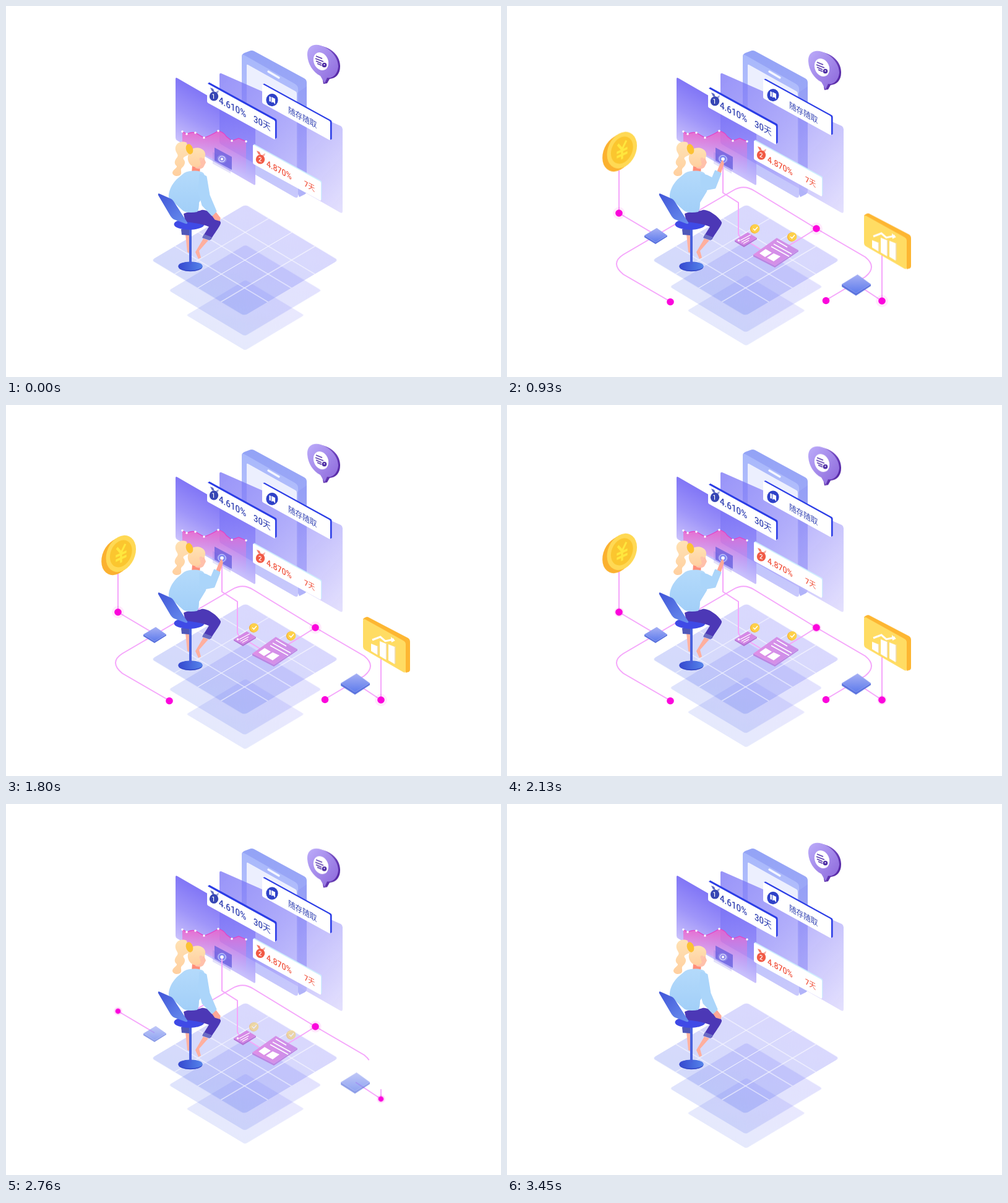
Recreate the animation shown at these times as an HTML page. Size 800 px wide and 600 px high, loop 3480 ms.

```html
<!DOCTYPE html>
<html lang="zh">
<head>
<meta charset="utf-8">
<title>Isometric savings</title>
<style>
html, body { margin: 0; width: 100%; height: 100%; overflow: hidden; background: #fff; }
svg { display: block; width: 800px; height: 600px; }
text { font-family: Roboto, "Noto Sans CJK SC", "Noto Sans CJK", sans-serif; font-weight: 500; }

/* floating parts: two bobs per loop */
.bob { animation: bob 1740ms cubic-bezier(.37, 0, .63, 1) infinite; }
@keyframes bob { 50% { transform: translateY(var(--dy)); } }

.main, .net, .stem, .card, .doc, .tick, .cube, .pop, .hub, .joint, .lit, .arm, .hand {
  animation: 3480ms linear infinite;
}
.wire { fill: none; stroke: #f5a6fb; stroke-width: 2; stroke-dasharray: 1 2; }
.main { animation-name: main; }
.net { animation-name: net; }
.stem { animation-name: stem; }
@keyframes main { 0%, 5.17% { stroke-dashoffset: 1; } 12.64%, 80.5% { stroke-dashoffset: 0; } 89%, 100% { stroke-dashoffset: 1; } }
@keyframes net { 0%, 12.9% { stroke-dashoffset: 1; } 22.5%, 75.9% { stroke-dashoffset: 0; } 82.8%, 100% { stroke-dashoffset: 1; } }
@keyframes stem { 0%, 18.4% { stroke-dashoffset: 1; } 23.6%, 77% { stroke-dashoffset: 0; } 81.9%, 100% { stroke-dashoffset: 1; } }

.card { animation-name: card; }
.doc { animation-name: doc; }
.tick { animation-name: tick; }
.cube { animation-name: cube; }
.lit { animation-name: lit; }
@keyframes card { 0%, 7.7% { opacity: 0; } 11.2%, 87.4% { opacity: 1; } 92%, 100% { opacity: 0; } }
@keyframes doc { 0%, 11.4% { opacity: 0; } 15.5%, 81% { opacity: 1; } 88%, 100% { opacity: 0; } }
@keyframes tick { 0%, 15.5% { opacity: 0; } 20.1%, 77.6% { opacity: 1; } 81%, 100% { opacity: 0; } }
@keyframes cube { 0%, 17.2% { opacity: 0; } 20.1%, 78.2% { opacity: 1; } 81.9%, 100% { opacity: 0; } }
@keyframes lit { 0%, 4.3% { opacity: 0; } 6.5%, 79.3% { opacity: 1; } 94%, 100% { opacity: 0; } }

.pop { animation-name: pop; }
.pop.fade { animation-name: pop, fade; }
.hub { animation-name: hub; }
.joint { animation-name: joint; }
.mid { transform-box: fill-box; transform-origin: center; }
@keyframes pop { 0%, 20.1% { transform: scale(0); } 25.9%, 69% { transform: none; } 76.4%, 100% { transform: scale(0); } }
@keyframes fade { 0%, 20.1% { opacity: 0; } 25.9%, 69% { opacity: 1; } 76.4%, 100% { opacity: 0; } }
@keyframes hub { 0%, 12.4% { transform: scale(0); } 16.1%, 80.5% { transform: none; } 83.3%, 100% { transform: scale(0); } }
@keyframes joint { 0%, 20.7% { transform: scale(0); } 24.1%, 78.4% { transform: none; } 82.2%, 100% { transform: scale(0); } }
.halo { opacity: .08; animation: halo 870ms ease-in-out infinite; transform-box: fill-box; transform-origin: center; }
@keyframes halo { 50% { transform: scale(.75); opacity: .14; } }

.arm { animation-name: arm; }
.hand { animation-name: hand; }
@keyframes arm {
  0%, .9%, 77.6%, 100% { d: path("M314 272L323 276L328 306L339 332L333 338L318 322L312 300Z"); }
  5.75%, 69.8% { d: path("M314 272L324 275L332 279L337 267L345 271L336 294L314 298Z"); }
}
@keyframes hand {
  0%, .9%, 77.6%, 100% { d: path("M333 338L339 334L346 343L345 347L338 345Z"); }
  5.75%, 69.8% { d: path("M340 268L345 270L350 255L348 250L344 258Z"); }
}
</style>
</head>
<body>
<svg viewBox="0 0 800 600">
<defs>
  <linearGradient id="floor"><stop stop-color="#6078f0"/><stop offset="1" stop-color="#7470fa"/></linearGradient>
  <linearGradient id="left" x2="0" y2="1"><stop stop-color="#8176f6"/><stop offset=".5" stop-color="#9f95f9"/><stop offset="1" stop-color="#cac1fc"/></linearGradient>
  <linearGradient id="right" x2="1" y2="1"><stop stop-color="#6c66f5" stop-opacity=".9"/><stop offset=".45" stop-color="#958ef9" stop-opacity=".88"/><stop offset="1" stop-color="#d9d4fd" stop-opacity=".9"/></linearGradient>
  <linearGradient id="phone" x2="0" y2="1"><stop stop-color="#a8b8fb"/><stop offset="1" stop-color="#c9c9fc"/></linearGradient>
  <linearGradient id="edge" x2="0" y2="1"><stop stop-color="#93a3f6"/><stop offset="1" stop-color="#b2b4f9"/></linearGradient>
  <linearGradient id="pink" x2="0" y2="1"><stop stop-color="#f062c8" stop-opacity=".85"/><stop offset="1" stop-color="#e69cf0" stop-opacity="0"/></linearGradient>
  <linearGradient id="bubble" x2="1" y2="1"><stop stop-color="#bcacfa"/><stop offset="1" stop-color="#8b66da"/></linearGradient>
  <linearGradient id="deep" x2="1" y2="1"><stop stop-color="#8a68da"/><stop offset="1" stop-color="#4d1c9c"/></linearGradient>
  <linearGradient id="back" x2="1" y2="1"><stop stop-color="#4055d8"/><stop offset="1" stop-color="#6a90ee"/></linearGradient>
  <linearGradient id="base"><stop stop-color="#3548cf"/><stop offset="1" stop-color="#5584ea"/></linearGradient>
  <linearGradient id="slab" x2="0" y2="1"><stop stop-color="#a6b0f4"/><stop offset="1" stop-color="#5f7cec"/></linearGradient>
  <linearGradient id="knit" x2="0" y2="1"><stop stop-color="#b4dafb"/><stop offset="1" stop-color="#a2cff8"/></linearGradient>
  <linearGradient id="hair" x2="0" y2="1"><stop stop-color="#ffe2b4"/><stop offset="1" stop-color="#ffcf9f"/></linearGradient>
  <linearGradient id="paper" x2="1"><stop stop-color="#e08fe6"/><stop offset="1" stop-color="#c890ea"/></linearGradient>
  <rect id="tile" width="100" height="100" rx="3" fill="url(#floor)"/>
  <rect id="plate" width="127" height="31" rx="2"/>
  <g id="slabs">
    <path d="M-18 0L0 11L19 0V2L0 14L-18 3Z" fill="#5a72de"/>
    <path d="M-18 0L2 -12L19 0L0 11Z" fill="url(#slab)"/>
  </g>
  <g id="ok">
    <circle cx="-.8" cy=".6" r="7.3" fill="#f8b22e"/>
    <circle cx=".4" r="7" fill="#fdd04a"/>
    <path d="M-3 0L-.5 2.6L4 -2.4" fill="none" stroke="#fff" stroke-width="1.5"/>
  </g>
  <g id="medal">
    <path d="M-6 -14L-1 -12L1 -7L-3 -8Z" opacity=".8"/>
    <path d="M3 -7L8 -10L7 -6L4 -4Z" opacity=".5"/>
    <ellipse rx="7.2" ry="7.6"/>
  </g>
</defs>

<!-- floor -->
<g class="bob" style="--dy:-7.5px"><use href="#tile" transform="matrix(.955 -.57 .95 .57 291.5 500)" opacity=".16"/></g>
<g class="bob" style="--dy:-6px"><use href="#tile" transform="matrix(1.24 -.74 1.23 .74 263 460)" opacity=".2"/></g>
<g transform="matrix(1.52 -.9 1.5 .9 235 411)">
  <use href="#tile" opacity=".27"/>
  <path d="M25 0V100M50 0V100M75 0V100M0 25H100M0 50H100M0 75H100" stroke="#fff" stroke-opacity=".85" vector-effect="non-scaling-stroke"/>
</g>

<!-- phone -->
<path d="M381 82Q381 78 385 76L393 73Q397 71 401 73L482 117Q486 119 486 124V299Q486 303 482 305L474 309L470 300V140L384 92Z" fill="url(#edge)"/>
<path d="M381 82Q381 77 386 80L467 126Q472 129 472 134V306Q472 312 466 309L386 263Q381 260 381 255Z" fill="url(#phone)"/>
<path d="M389 96Q389 94 391 95L468 138Q470 139 470 142V284L389 240Z" fill="#eceffe"/>
<path d="M424 106L441 116" stroke="#f4f6ff" stroke-width="3.4" stroke-linecap="round"/>

<!-- screens -->
<g transform="matrix(.866 .5 0 1 274 115)"><rect width="149" height="101" rx="3" fill="url(#left)"/></g>
<path d="M345 111Q345 108 348 109L541 194Q544 196 544 199V332Q544 336 540 334L348 224Q345 222 345 219Z" fill="url(#right)" opacity=".78"/>
<path d="M470 141L486 130V290L470 280Z" fill="#7470f0" opacity=".15"/>
<path d="M285 203L292 207Q300 203 306 205L320 213Q330 210 343 202Q352 204 356 211L365 218L376 214L388 219V275L285 222Z" fill="url(#pink)"/>
<path d="M285 203L292 207Q300 203 306 205L320 213Q330 210 343 202Q352 204 356 211L365 218L376 214L388 219" fill="none" stroke="#e640c6" stroke-width="1.2"/>
<path d="M285 203h0M292 207h0M306 205h0M320 213h0M343 202h0M365 218h0M388 219h0" stroke="#fff" stroke-width="3.6" stroke-linecap="round"/>
<path d="M334 236L363 252V271L334 255Z" fill="#7a70e6" opacity=".2"/>
<path d="M337 229L365 244V265L337 250Z" fill="#5a55dc" opacity=".68"/>
<ellipse cx="349" cy="247.500" rx="8" ry="6.500" fill="#a5a6f2" opacity=".5" transform="rotate(20 349 247.500)"/>
<ellipse cx="349" cy="247.500" rx="5" ry="4.500" fill="none" stroke="#dcdcff" stroke-width="1.2"/>
<circle cx="349" cy="247.500" r="2" fill="#fff"/>
<g class="lit">
  <circle cx="349" cy="247.500" r="6" fill="#8089f2" stroke="#d0d4ff"/>
  <circle cx="349" cy="247.500" r="2.800" fill="#fff"/>
</g>

<!-- rate cards -->
<g class="bob" style="--dy:8px">
  <g transform="matrix(.866 .476 0 1 325 125)" fill="#2b3de6">
    <use href="#plate" x="3" y="-3.500"/><use href="#plate" x="1.500" y="-1.800"/><use href="#plate" fill="#fff"/>
  </g>
  <g fill="#3646b4">
    <use href="#medal" x="336" y="146"/>
    <text transform="matrix(.866 .476 0 1 344 156.500)" font-size="15.5">4.610%</text>
    <text transform="matrix(.866 .476 0 1 400 187)" font-size="15">30天</text>
    <text transform="matrix(.866 .3 0 1 332.500 149)" font-size="11" fill="#fff">1</text>
  </g>
</g>
<g class="bob" style="--dy:-8px">
  <g transform="matrix(.866 .476 0 1 414 126)" fill="#2b3de6">
    <use href="#plate" x="3" y="-2.500"/><use href="#plate" x="1.500" y="-1.300"/><use href="#plate" fill="#fff"/>
  </g>
  <ellipse cx="430" cy="152" rx="9.600" ry="10.200" fill="#2f42c8"/>
  <path d="M425.500 146L428 147V155L425.500 154ZM429 147L435 150V159L432 155.500L429 156Z" fill="#fff"/>
  <text transform="matrix(.866 .476 0 1 456 172.500)" font-size="13.4" fill="#3646b4">随存随取</text>
</g>
<g class="bob" style="--dy:-7px">
  <g transform="matrix(.866 .476 0 1 399 224)" fill="#cdeefd">
    <use href="#plate" x="1.500" y="-2"/><use href="#plate" fill="#fff"/>
  </g>
  <g fill="#f15a45">
    <use href="#medal" x="411" y="248"/>
    <text transform="matrix(.866 .476 0 1 421 259)" font-size="14.3">4.870%</text>
    <text transform="matrix(.866 .476 0 1 482 291)" font-size="12.6">7天</text>
    <text transform="matrix(.866 .3 0 1 408 251)" font-size="11" fill="#fff">2</text>
  </g>
</g>

<!-- speech bubble -->
<g class="bob" style="--dy:10px">
  <path d="M497 66C512 60 541 74 540 98C540 110 533 117 523 118L519 125L513 126L511 115Z" fill="url(#deep)"/>
  <path d="M487 80C486 66 496 60 509 64C524 69 537 83 537 98C536 111 527 118 519 116L515 125L508 113C496 107 488 94 487 80Z" fill="url(#bubble)"/>
  <ellipse cx="509" cy="89.500" rx="11.500" ry="15" fill="#fff" transform="rotate(-24 509 89.500)"/>
  <path d="M501 81L511 85M500 85L513 90M501 89L510 93M503 93L510 96" stroke="#5a3ab0" stroke-width="1.700"/>
  <circle cx="514.500" cy="95.500" r="3.800" fill="#4d2ca4"/>
  <circle cx="514.500" cy="95" r="1.100" fill="#fff"/>
</g>

<!-- wires -->
<g class="wire">
  <path class="main" pathLength="1" d="M349 250V302L374 318V368Q374 371 378 374L420 400Q426 404 433 401L481 372L500 360"/>
  <path class="net" pathLength="1" d="M500 360L400 299Q383 288 366 298L188 402Q166 416 188 434L264 478"/>
  <path class="net" pathLength="1" d="M500 360L579 406Q599 422 579 438L515 476"/>
  <path class="stem" pathLength="1" d="M240 370L181 335V266"/>
  <path class="stem" pathLength="1" d="M565 450L606 477V402"/>
</g>

<!-- papers on the floor -->
<g class="card">
  <path d="M368 379L383 387L404 375V377L383 390L368 381Z" fill="#b470d4"/>
  <path d="M368 379L389 366L404 375L383 387Z" fill="#d588e6"/>
  <path d="M377 379L394 370M379 382L392 375M382 384L391 379" stroke="#fff" stroke-width="1.300"/>
  <circle cx="374.500" cy="379" r="1.800" fill="#fff"/>
</g>
<g class="doc">
  <path d="M398 402L433 420L471 395V397L433 423L398 405Z" fill="#bb84e2"/>
  <path d="M398 402L436 375L471 395L433 420Z" fill="url(#paper)"/>
  <path d="M408 400L418 393L428 399L417 406ZM420 407L431 400L442 405L431 413Z" fill="#fff"/>
  <path d="M436 380L453 390M431 385L460 401M427 389L456 405" stroke="#fff" stroke-width="1.600"/>
</g>
<g class="tick"><use href="#ok" x="401" y="360"/><use href="#ok" x="461" y="373"/></g>
<g class="cube">
  <use href="#slabs" x="240" y="371"/>
  <use href="#slabs" transform="translate(564 450) scale(1.270 1.320)"/>
</g>

<!-- nodes -->
<g fill="#fb05dc">
  <g class="hub mid"><circle class="halo" cx="500" cy="360" r="10"/><circle cx="500" cy="360" r="5.800"/></g>
  <g class="joint mid"><circle class="halo" cx="181" cy="335" r="10"/><circle cx="181" cy="335" r="5.800"/></g>
  <g class="joint mid"><circle class="halo" cx="606" cy="477" r="10"/><circle cx="606" cy="477" r="5.800"/></g>
  <circle class="pop mid" cx="264" cy="478.500" r="5.800"/>
  <circle class="pop mid" cx="515.500" cy="476.500" r="5.800"/>
</g>

<!-- coin -->
<g class="bob" style="--dy:-7.5px"><g class="pop fade" style="transform-origin:181px 275px">
  <g fill="#fbb130">
    <ellipse rx="22.500" ry="31" transform="translate(178.400 245.500) rotate(25)"/>
    <ellipse rx="22.500" ry="31" transform="translate(182 243) rotate(25)"/>
  </g>
  <g transform="translate(185.800 240.500) rotate(25)">
    <ellipse rx="22.500" ry="31" fill="#ffd954"/>
    <ellipse rx="16.500" ry="23" fill="#fbc62f"/>
  </g>
  <path d="M-8 -13L0 -2L8 -13M0 -2V14M-10 0H10M-10 7H10" transform="matrix(.866 -.4 0 1 186 241)" fill="none" stroke="#ffe73e" stroke-width="4"/>
</g></g>

<!-- bar chart sign -->
<g class="bob" style="--dy:-7.5px"><g class="pop fade" style="transform-origin:606px 411px">
  <path d="M577 347Q577 345 582 343Q584 342 587 344L650 377Q653 379 653 383V428Q653 431 650 432L646 433L640 390Z" fill="#fdb632"/>
  <path d="M577 349Q577 345 581 347L642 381Q646 383 646 387V430Q646 434 642 432L580 396Q577 394 577 391Z" fill="#ffdc63"/>
  <path d="M590 386L600 390V404L590 398ZM604 382L614 386V412L604 406ZM618 387L628 391V419L618 413Z" fill="#fff"/>
  <path d="M600 390L602 389V404L600 404ZM614 386L616 385V411L614 412ZM628 391L630 390V418L628 419Z" fill="#f3dca4"/>
  <path d="M592 380L605 375L613 382L627 379" fill="none" stroke="#fff" stroke-width="3"/>
  <path d="M622 375L629 381L623 384Z" fill="#fff"/>
</g></g>

<!-- seated woman -->
<path d="M290 369H296L297 400L293 398Z" fill="#ffb3a2"/>
<path d="M283 361H297V371L284 370Z" fill="#5058b8"/>
<ellipse cx="298" cy="421.500" rx="19.500" ry="7.800" fill="#3448c8"/>
<ellipse cx="298" cy="420.500" rx="19.500" ry="7" fill="url(#base)"/>
<path d="M298 360V418" stroke="#4961dc" stroke-width="4"/>
<ellipse cx="296" cy="353" rx="24.500" ry="9" fill="#3f4ae6"/>
<path d="M319 376L327 379L312 396L315 407L311 409L306 398Z" fill="#ffaf9e"/>
<path d="M287 336C296 331 310 333 316 330C327 328 345 344 347 350C348 354 335 370 331 378L318 373L328 357C316 352 300 350 290 349Z" fill="#4c38b6"/>
<path d="M320 369L333 374L329 379L317 375Z" fill="#6a6cc4"/>
<path d="M301 258L314 259L313 271L300 271Z" fill="#ff8d79"/>
<path class="hand" d="M333 338L339 334L346 343L345 347L338 345Z" fill="#ffa896" stroke="#ffa896" stroke-width="1.500" stroke-linejoin="round"/>
<path d="M288 270C298 265 314 266 319 270C324 277 325 290 323 300L312 318C312 325 311 331 309 333C300 335 290 334 286 331L263 310C262 300 268 288 276 280Z" fill="url(#knit)"/>
<path class="arm" d="M314 272L323 276L328 306L339 332L333 338L318 322L312 300Z" fill="#abd5fa" stroke="#abd5fa" stroke-width="3" stroke-linejoin="round"/>
<path d="M306 238C316 236 322 243 321 248L323 253L320 259C318 264 312 264 306 262Z" fill="#ffc0aa"/>
<path d="M292 221C281 216 272 224 274 233C275 238 279 240 277 244C272 250 271 255 276 259C277 262 269 265 269 270C270 276 279 276 282 273C285 269 281 266 284 262C289 258 291 252 287 248C285 244 291 243 296 240Z" fill="url(#hair)"/>
<path d="M296 238C298 229 312 226 319 233C323 237 323 243 320 247C315 245 312 250 315 256C312 263 301 262 296 254C293 249 293 243 296 238Z" fill="url(#hair)"/>
<ellipse cx="315" cy="248" rx="2.500" ry="3" fill="#ffc4ac"/>
<ellipse cx="296.500" cy="231.500" rx="5.500" ry="8.500" fill="#fcc234" transform="rotate(-18 296.500 231.500)"/>
<path d="M246 306Q245 302 249 304L267 312Q269 313 271 316L293 350Q294 353 290 352L271 345Q268 343 266 340Z" fill="url(#back)"/>
</svg>
</body>
</html>
```
